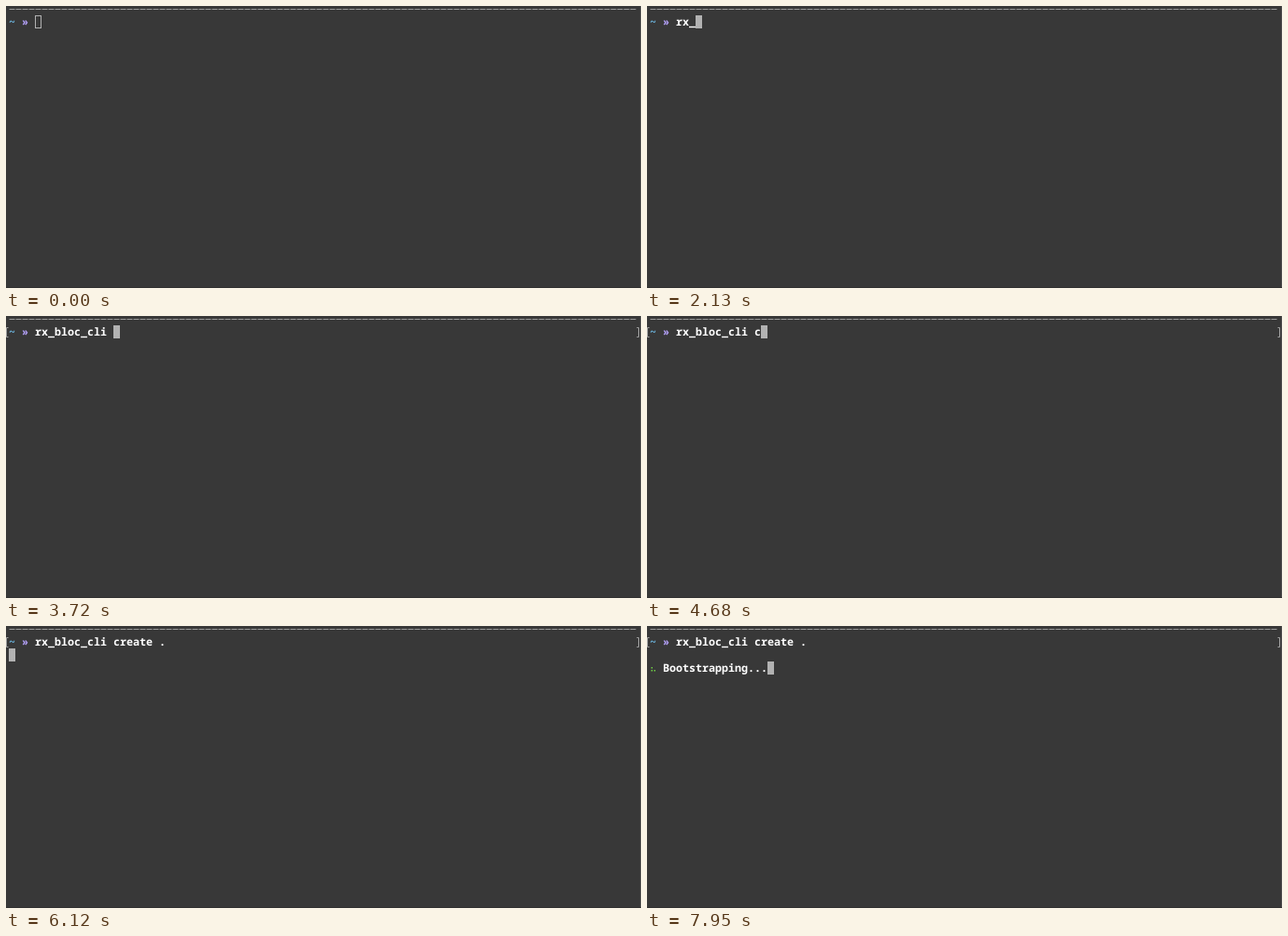
An HTML page that plays this animation: 680x302 px, repeating every 8 s.

```html
<!DOCTYPE html>
<html lang="en">
<head>
<meta charset="utf-8">
<title>Terminal</title>
<style>
  html, body { margin: 0; width: 100%; height: 100%; overflow: hidden; background: #383838; }
  svg { display: block; width: 680px; height: 302px; }
  text {
    font: 700 11.667px "Noto Sans Mono", "DejaVu Sans Mono", monospace;
    fill: #fff;
    white-space: pre;
    text-rendering: geometricPrecision;
  }
  .line { fill: none; stroke-width: 1; }
</style>
</head>
<body>
<svg viewBox="0 0 680 302">
  <rect width="680" height="302" fill="#383838"/>
  <path class="line" d="M679.5 0V302" stroke="#4a4a4a"/>
  <path class="line" d="M0 301.5H680" stroke="#303030"/>
  <path class="line" d="M3.5 3.5H675" stroke="#9a9a9a" stroke-dasharray="6 1"/>
  <path class="line" id="marks" d="M2.5 12.5H.5V22.5H2.5M675.5 12.5H677.5V22.5H675.5" stroke="#a2a2a2"/>
  <rect id="cursor"/>
  <text x="3" y="21" style="fill:#72c4f2">~</text>
  <text x="17" y="21" style="fill:#b3a0f8">»</text>
  <text x="31" y="21" id="command"></text>
  <text x="17" y="49" id="status">Bootstrapping...</text>
  <g id="spinner" fill="#6fcf45"></g>
</svg>
<script>
  const LOOP = 8000, CELL = 7, ROW = 14, LEFT = 3, TOP = 10;
  const COMMAND = "rx_bloc_cli create .";
  const FOCUS = 1500, COMPLETE = 3720, ENTER = 6120;

  // [time, characters of the command visible]
  const KEYS = [
    [0, 0], [1620, 1], [1800, 2], [2070, 3], [2370, 4], [2520, 5],
    [2670, 6], [2790, 7], [3540, 8], [COMPLETE, 12], [4680, 13],
    [4920, 14], [5010, 15], [5190, 16], [5280, 17], [5370, 18],
    [5580, 19], [5790, 20]
  ];
  const TICKS = [7500, 7590, 7650, 7740, 7800, 7890, 7950];
  const SPINNER = "⠋⠙⠹⠸⠼⠴⠦";

  const el = id => document.getElementById(id);
  const show = (node, on) => node.setAttribute("visibility", on ? "visible" : "hidden");
  const set = (node, attrs) => {
    for (const name in attrs) node.setAttribute(name, attrs[name]);
  };

  const dots = Array.from({ length: 6 }, (_, i) => {
    const dot = document.createElementNS("http://www.w3.org/2000/svg", "rect");
    set(dot, { x: i < 3 ? 4.5 : 7.5, y: 41 + (i % 3) * 3, width: 1.5, height: 1.5 });
    el("spinner").append(dot);
    return dot;
  });

  function drawCursor(col, row, solid) {
    const inset = solid ? 0 : 0.5;
    set(el("cursor"), {
      x: LEFT + col * CELL + inset,
      y: TOP + row * ROW + inset,
      width: CELL - 2 * inset,
      height: ROW - 2 * inset,
      fill: solid ? "#b2b2b2" : "none",
      stroke: solid ? "none" : "#b2b2b2"
    });
  }

  function render(t) {
    const typed = KEYS.filter(([time]) => time <= t).pop()[1];
    const tick = TICKS.filter(time => time <= t).length - 1;
    const running = tick >= 0;

    el("command").textContent = COMMAND.slice(0, typed);
    show(el("marks"), t >= COMPLETE);
    show(el("status"), running);

    // The low six bits of a braille code point select its dots.
    const mask = running ? SPINNER.charCodeAt(tick) & 63 : 0;
    dots.forEach((dot, i) => show(dot, mask >> i & 1));

    if (running) drawCursor(18, 2, true);
    else if (t >= ENTER) drawCursor(0, 1, true);
    else drawCursor(4 + typed, 0, t >= FOCUS);
  }

  const start = performance.now();
  function frame() {
    render((performance.now() - start) % LOOP);
    requestAnimationFrame(frame);
  }
  frame();
</script>
</body>
</html>
```
